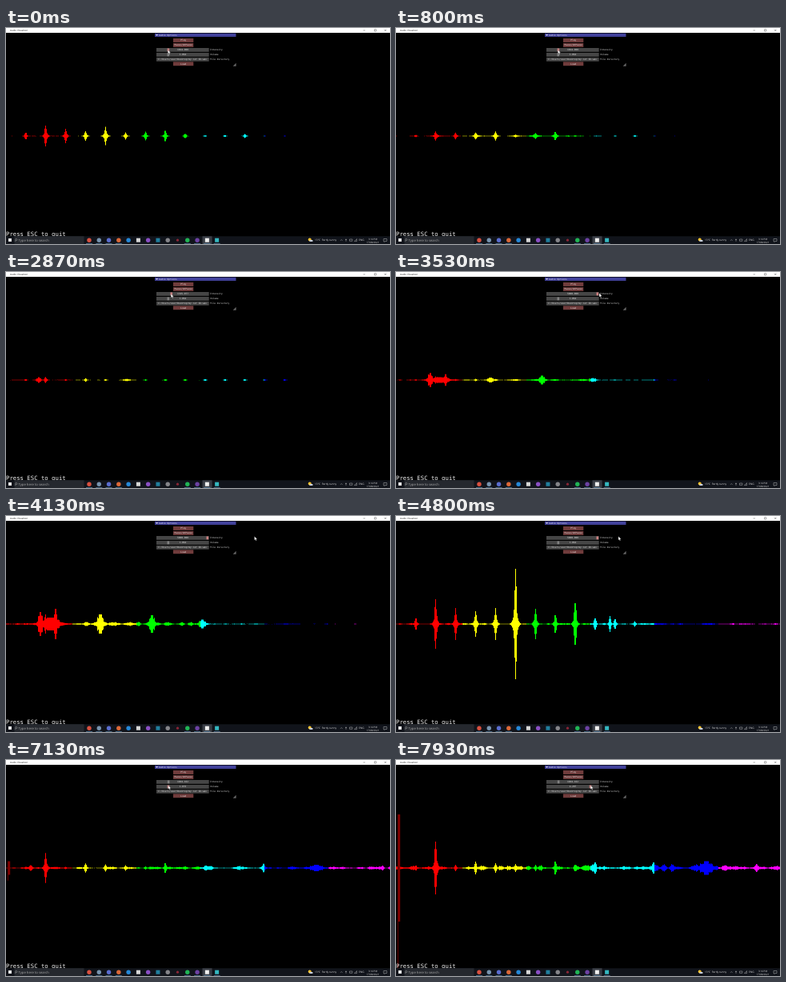
An HTML page for the animation above (8 s loop, 480 px wide and 270 px high).

```html
<!DOCTYPE html>
<html lang="en">
<head>
<meta charset="utf-8">
<title>Audio Visualizer</title>
<style>
html, body { margin: 0; width: 100%; height: 100%; overflow: hidden; background: #000; }
svg { display: block; width: 100vw; height: 100vh; }
text { text-rendering: geometricPrecision; white-space: pre; }
.mono { font-family: "DejaVu Sans Mono", monospace; font-size: 2.9px; fill: #ddd; }
.ui { font-family: "Open Sans", sans-serif; fill: #ddd; }
.mid { text-anchor: middle; }
</style>
</head>
<body>
<svg id="stage" viewBox="0 0 480 270" xmlns="http://www.w3.org/2000/svg"></svg>
<script>
const LOOP = 8000, FPS = 15, MID = 135, STEP = 24.9;
const stage = document.getElementById('stage');

function add(tag, attrs, content) {
  const el = document.createElementNS('http://www.w3.org/2000/svg', tag);
  for (const k in attrs) el.setAttribute(k, attrs[k]);
  if (content !== undefined) el.textContent = content;
  stage.appendChild(el);
  return el;
}
const rect = (x, y, width, height, fill) => add('rect', { x, y, width, height, fill });
const dot = (cx, cy, r, fill) => add('circle', { cx, cy, r, fill });
const line = (d, stroke) => add('path', { d, stroke, fill: 'none', 'stroke-width': 0.4 });
const mono = (x, y, s, mid) => add('text', { x, y, class: mid ? 'mono mid' : 'mono' }, s);
const ui = (x, y, size, s, fill = '#ddd', cls = 'ui') =>
  add('text', { x, y, class: cls, style: `font-size:${size}px;fill:${fill}` }, s);

// Spectrum
rect(0, 0, 480, 270, '#000');
const bands = ['#f00', '#ff0', '#0f0', '#0ff', '#00f', '#f0f']
  .map(fill => add('path', { fill }));
const edge = band => band ? Math.round(3 + band * 79.9) : 0;
const bassWide = add('path', { fill: '#800000' });
const bassThin = add('path', { fill: '#680000' });

// Title bar
rect(0, 0, 480, 6, '#fff');
ui(5, 4.1, 3, 'Audio Visualizer', '#222');
line('M446.5 3h2.5M460.5 1.8h2.3v2.3h-2.3z', '#333');
line('M473 1.7l2.5 2.5m0-2.5l-2.5 2.5', '#333');

// Options panel
rect(186, 6.5, 102, 41.8, '#000');
rect(186, 6.7, 101.5, 4.3, '#41419a');
add('path', { d: 'M187.3 8h2.6l-1.3 2.1z', fill: '#ddd' });
mono(191, 9.9, 'Audio Options');
function button(y, s) {
  rect(209, y, 25.3, 4.9, '#703c3c');
  mono(221.7, y + 3.4, s, true);
}
function field(y, s) {
  rect(188, y, 65.7, 4.8, '#464646');
  mono(255, y + 3.3, s);
}
function slider(y, s) {
  field(y, s);
  const grab = rect(0, y + 0.5, 2.6, 3.8, '#888');
  const label = mono(221, y + 3.3, '', true);
  return (x, text, held) => {
    grab.setAttribute('x', x - 1.3);
    grab.setAttribute('fill', held ? '#cc8080' : '#808080');
    label.textContent = text;
  };
}
button(13, 'Play');
button(19, 'Pause/UnPause');
const setIntensity = slider(25, 'Intensity');
const setVolume = slider(31, 'Volume');
field(36.9, 'File Directory');
mono(190, 40.2, 'C:/Users/user/Desktop/my cut 1b.wav');
button(42.3, 'Load');
add('path', { d: 'M287.6 43.8v4h-4z', fill: '#666' });

// Prompt and taskbar
add('text', { x: 0, y: 259.6, class: 'mono', style: 'font-size:7.3px;fill:#eee' }, 'Press ESC to quit');
rect(0, 260.3, 480, 9.7, '#11141b');
rect(10.5, 260.3, 87, 9.7, '#25282e');
rect(3, 263, 4, 4, '#e8e8e8');
add('circle', { cx: 12.7, cy: 264.7, r: 1.2, fill: 'none', stroke: '#ccc', 'stroke-width': 0.4 });
line('M12 265.7l-1 1.2', '#ccc');
ui(15.5, 266.5, 4.2, 'Type here to search', '#aaa');
rect(245.5, 260.3, 12, 9.7, '#3a3e46');
['#d9503f', '#7894b0', '#5a6dd0', '#dd6838', '#2588d8', '#d8d8d8', '#8a4fc4',
 '#217f9e', '#85858a', '#8c2636', '#20b455', '#6d42a4', '#f0f0f0', '#35b8c0']
  .forEach((fill, i) => {
    const x = 104 + i * 12.28;
    if (i === 5 || i === 7 || i > 11) rect(x - 2.5, 262.7, 5, 5, fill);
    else dot(x, 265.2, i === 9 ? 1.6 : 2.7, fill);
    if (i < 4 || i > 9) rect(x - 4, 269.4, 8, 0.6, '#6a9cc4');
  });
dot(379.7, 264.6, 2, '#f6c22e');
rect(379.4, 265, 4, 2, '#c8d0dc');
ui(386, 266.4, 3.2, '13°C  Partly sunny');
line('M418 265.8l1.3-1.3 1.3 1.3M425 263.5v3.4M424 264.5h2', '#ddd');
line('M429.5 264h3.4v2.3h-3.4zM435.5 266.6l3-3v3z', '#ddd');
ui(441, 266.4, 3.2, 'ENG');
ui(458.5, 264.6, 3, '3:14 PM', '#ddd', 'ui mid');
ui(458.5, 268.7, 3, '17/08/2021', '#ddd', 'ui mid');
line('M472 263.5h4v3h-2l-1 1v-1h-1z', '#ddd');

const pointer = add('path', {
  d: 'M0 0v4.6l1.1-1 .8 1.7.8-.4-.8-1.6h1.5z',
  fill: '#fff', stroke: '#222', 'stroke-width': 0.2
});

// Sound poses: tones are harmonic heights, floor is the noise per band,
// peaks are extra lumps as [x, height, width]
const fade = (start, ratio) => band => start * ratio ** band;
const pose = (step, floor, tones = [], peaks = [], tail = 0) => ({ step, floor, tones, peaks, tail });
const poses = [
  pose(0, fade(0.3, 0.6), [4, 13, 9, 6, 11.5, 4.5, 5.5, 6.5, 2.5, 0.7, 1.1, 2.5], [], 0.4),
  pose(25, b => b < 3 ? 0.8 + b * 0.15 : 0.1, [],
    [[51, 1, 5], [104, 1.3, 5], [150, 1.3, 5], [174, 1.5, 5], [252, 1, 3]]),
  pose(43, fade(0.5, 0.5), [1, 3.8, 1, 2.2], [[41, 3.5, 1.6], [151, 1.2, 3]], 1),
  pose(62, b => b < 3 ? 1.4 + 1.4 * Math.min(b, 1) : 6.5 * 0.52 ** b, [0, 12],
    [[43, 15, 1.6], [62, 19, 1.3], [56, 8, 7], [118, 12, 2.5], [182.5, 11, 2.2], [245.5, 5.5, 2.6]]),
  pose(72, fade(1.3, 0.95), [7, 31, 20, 16, 20, 69, 19, 11, 26, 7, 6, 3.5], [[267.5, 10, 0.8]]),
  pose(93, fade(0.9, 0.9), [], [[31, 4.5, 1.3], [62, 2.8, 4], [205, 2.3, 1.5], [240, 2.2, 2]]),
  pose(119, fade(2.8, 1.18), [3, 33, 4, 8, 6, 5, 4, 8, 4, 7], [[322, 7, 1.5], [388, 8.5, 5]])
];

function rand(a, b = 0) {
  let h = Math.imul(a + 101, 374761393) ^ Math.imul(b + 57, 668265263);
  h = Math.imul(h ^ (h >>> 13), 1274126177);
  return ((h ^ (h >>> 16)) >>> 0) / 4294967296;
}
const mix = (a, b, u) => a + (b - a) * u;
const ease = u => u * u * (3 - 2 * u);
function smooth(x, seed) {
  const i = Math.floor(x);
  return mix(rand(i, seed), rand(i + 1, seed), ease(x - i));
}
const shape = d => d < 0.7 ? 1 : d < 1.6 ? 0.72 : 0.36 * Math.exp((1.6 - d) / 1.5);

function level(p, band, x, step, flicker) {
  const cx = x + 0.5;
  const n = Math.max(1, Math.round(cx / STEP));
  const sway = id => flicker ? 0.45 + 0.95 * rand(id, step) : 1;
  const rough = d => d < 0.7 ? 1 : 0.75 + 0.25 * rand(x, step + 300);
  const lump = 0.1 + 0.9 * smooth(x / 5, step) ** 1.5;
  let v = p.floor(band) * lump * (0.6 + 0.5 * rand(x, step)) * sway(band + 700);
  const bump = (d, h, id) => { v = Math.max(v, h * shape(d) * sway(id) * rough(d)); };
  bump(Math.abs(cx - n * STEP), p.tones[n - 1] ?? (n < 15 ? p.tail : 0), n);
  p.peaks.forEach(([px, h, w], i) => bump(Math.abs(cx - px) / w, h, i + 40));
  return v;
}

function drawSpectrum(step) {
  let k = 0;
  while (k < poses.length - 2 && step >= poses[k + 1].step) k++;
  const a = poses[k], b = poses[k + 1];
  const u = (step - a.step) / (b.step - a.step);
  const flicker = u > 0 && u < 1;
  bands.forEach((path, j) => {
    let d = '';
    for (let x = edge(j); x < edge(j + 1); x++) {
      const h = mix(level(a, j, x, step, flicker), level(b, j, x, step, flicker), u);
      if (h > 0.12) d += `M${x} ${(MID - h).toFixed(2)}h1v${(2 * h).toFixed(2)}h-1z`;
    }
    path.setAttribute('d', d);
  });
  const bass = Math.max(0, (step - 105) / 14) * (step < 119 ? 0.4 + 0.6 * rand(step) : 1);
  const wide = 67 * bass;
  bassWide.setAttribute('d', `M3 ${MID - wide}h2.2v${2 * wide}H3z`);
  bassThin.setAttribute('d', `M2 ${MID - wide}h1v${wide + 125 * bass}H2z`);
}

// Pointer stops: ms, x
const MAXED = 251.4, REST = 202.65;
const stops = [
  [0, 202.4], [2750, 202.4], [3450, MAXED], [4080, 311], [4800, 278], [5250, MAXED],
  [6050, 193.5], [6200, 195.7], [6650, REST], [7100, REST], [7930, 243.2]
];
function pointerX(t) {
  let i = 0;
  while (i < stops.length - 2 && t >= stops[i + 1][0]) i++;
  const [t0, a] = stops[i], [t1, b] = stops[i + 1];
  return mix(a, b, ease((t - t0) / (t1 - t0)));
}
const clamp = (v, lo, hi) => Math.max(lo, Math.min(hi, v));

function render(ms) {
  const step = Math.floor((ms % LOOP) * FPS / 1000 + 0.06) % 120;
  const t = Math.round(step * 100 / FPS) * 10;
  const x = pointerX(t);
  const y = mix(27.5, 25.6, clamp((x - 240) / 30, 0, 1));
  const drop = clamp((t - 6650) / 300, 0, 1);
  const late = t >= 6650;
  const intensity = clamp(1024 + ((late ? 202.648 : x) - 202.4) * 81.3, 0, 5000);
  const volume = late ? 1.064 + (x - REST) * 0.0775 : 1.064;
  setIntensity(190.3 + intensity * 0.0123, intensity.toFixed(3), !late);
  setVolume(189.2 + volume * 12.8, volume.toFixed(3), t >= 7000);
  pointer.setAttribute('transform', `translate(${x} ${mix(y, 32, drop)})`);
  drawSpectrum(step);
}

function tick() {
  render(performance.now());
  requestAnimationFrame(tick);
}
tick();
</script>
</body>
</html>
```
